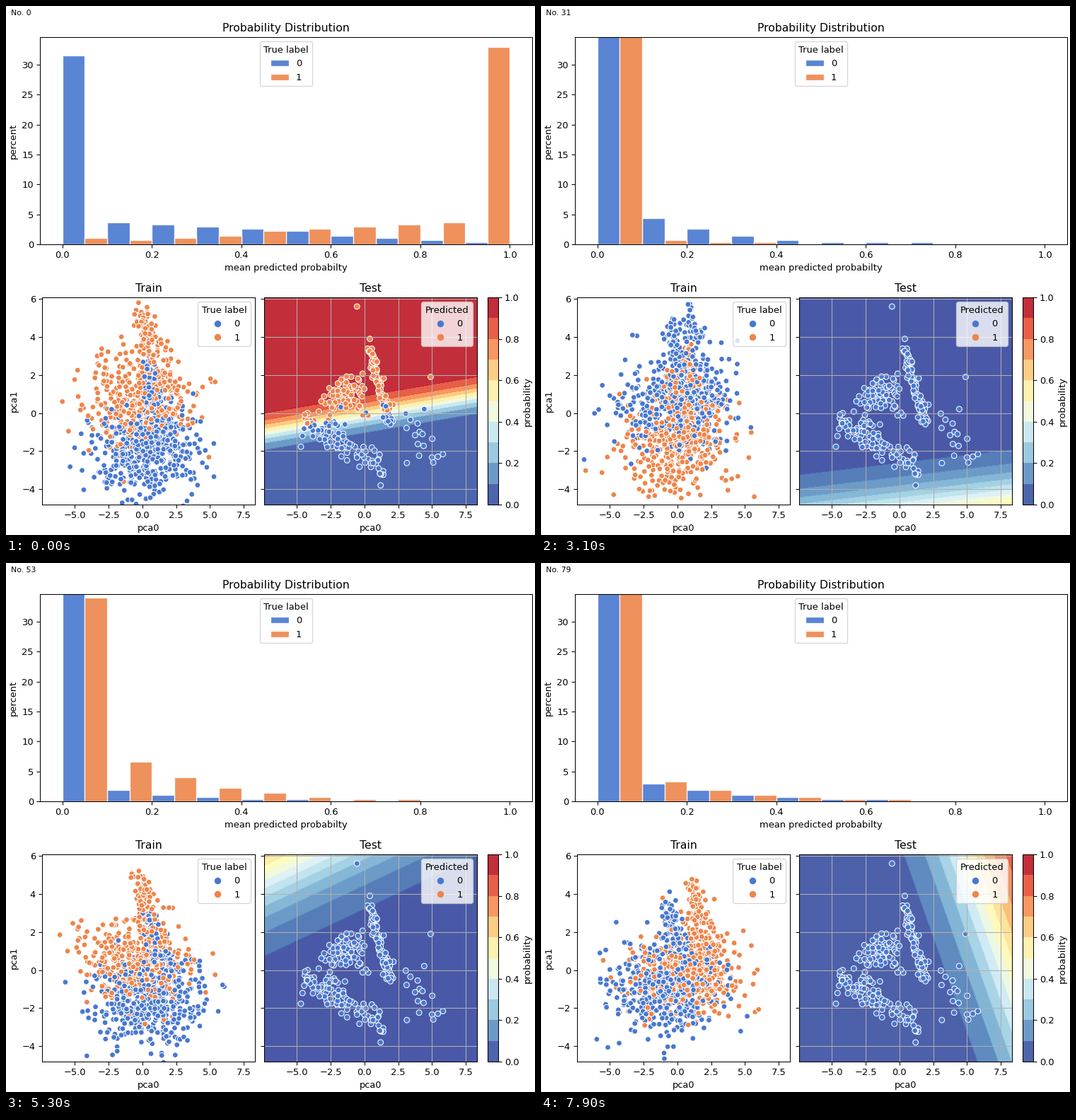
A matplotlib script that plays this animation: 748 by 748 pixels, repeating every 8 s.

```python
import numpy as np
import matplotlib.pyplot as plt
from matplotlib.animation import FuncAnimation
from matplotlib.lines import Line2D
from matplotlib.patches import Patch

SIZE, DPI = 748, 93.5
FRAMES, INTERVAL = 80, 100
COLORS = np.array(["#4878d0", "#ee854a"])
XLIM, YLIM = (-7.42, 8.33), (-4.81, 6.08)
N_TRAIN, N_TEST = 1098, 273
BINS = np.arange(10)

# The model drifts through a few states: the time, the plane a*x + b*y + c
# that is the logit of the probability, and how far the classes stand apart.
TIMES = [0, 10, 22, 39, 53, 61, 79]
FIELDS = np.array([
    (-0.278, 2.28, 0.15),
    (-0.097, 1.91, -6.93),
    (-0.493, -1.42, -5.71),
    (0.604, -0.70, -5.26),
    (-0.204, 0.61, -4.71),
    (0.372, -0.119, -4.29),
    (0.506, 0.253, -4.15),
])
APART = [1.4, 1.9, 1.8, 0.9, 1.1, 0.9, 1.0]

# Samples of each class outside the lowest bin, from the second state on
TAILS = [(0, 35, 28, 12, 16, 20), (18, 8, 4, 44, 14, 22)]

rng = np.random.default_rng(7)


def logit(field, x, y):
    a, b, c = field
    return a * x + b * y + c


def strip(n, start, end, width):
    """Points scattered along a line; width is (at start, at end)."""
    t = rng.random((n, 1))
    start, end = np.array(start), np.array(end)
    spread = width[0] + (width[1] - width[0]) * t
    return start + t * (end - start) + rng.normal(size=(n, 2)) * spread


def cloud(n):
    """A wide body with a spike on top."""
    body = rng.normal((-0.1, -0.6), (2.0, 1.2), (n, 2))
    spike = strip(n, (0.1, 3.9), (1.6, -0.5), (0.25, 0.8))
    return np.where(rng.random((n, 1)) < 0.3, spike, body)


def make_train(labels):
    """Push the classes apart along the slope of each field."""
    side = np.where(labels == 1, 1, -1)[:, None]
    states = []
    for field, apart in zip(FIELDS, APART):
        slope = field[:2] / np.hypot(*field[:2])
        states.append(cloud(N_TRAIN) + side * apart * slope)
    return np.array(states)


def make_test():
    points = np.vstack([
        [(-0.55, 5.6), (0.4, 3.9), (4.9, 1.9), (1.2, -3.8), (-4.7, -1.77)],
        strip(85, (0.4, 3.4), (1.95, -0.6), (0.12, 0.2)),
        strip(45, (-2.9, 0.5), (-0.1, 1.5), (0.4, 0.45)),
        strip(20, (-2.3, 1.4), (0.0, 0.2), (0.4, 0.4)),
        strip(40, (-4.2, -0.6), (-1.9, -1.0), (0.3, 0.45)),
        strip(53, (-2.7, -1.1), (1.4, -2.9), (0.28, 0.3)),
        rng.uniform((-0.6, -2.7), (6.0, 0.4), (25, 2)),
    ])
    return rng.permutation(points)


def make_counts(tails):
    """Bin counts per state: a ramp at first, then a geometric decay."""
    ramp = np.round(11 - 1.1 * BINS)
    decay = 0.4 * 0.6 ** (BINS - 1)
    table = np.array([ramp] + [np.round(tail * decay) for tail in tails])
    table[:, 0] = N_TEST // 2 - table[:, 1:].sum(axis=1)
    return table


train_labels = (rng.random(N_TRAIN) < 0.45).astype(int)
train_states = make_train(train_labels)
train_switch = rng.random((N_TRAIN, 1))
test_points = make_test()
test_noise = rng.normal(0, 0.9, N_TEST)
counts = [make_counts(tails) for tails in TAILS]
counts[1][0] = counts[1][0, ::-1]  # a good model puts class 1 on the right
counts[1][0, -1] += 4
counts[1][0, 0] += 2

fig = plt.figure(figsize=(SIZE / DPI, SIZE / DPI), dpi=DPI)


def add_axes(left, top, right, bottom):
    """Axes whose frame lies on the given pixel columns and rows."""
    return fig.add_axes([left / SIZE, 1 - (bottom + 1) / SIZE,
                         (right - left) / SIZE, (bottom - top) / SIZE])


def add_legend(ax, handles, title, loc):
    ax.legend(handles, ["0", "1"], title=title, loc=loc).set_zorder(6)


def add_scatter(ax, points):
    return ax.scatter(*points.T, s=36, edgecolors="w", linewidths=0.8)


bar_ax = add_axes(48, 43, 744.1, 336)
train_ax = add_axes(51, 411, 352, 704)
test_ax = add_axes(365, 411, 666, 704)
color_ax = add_axes(681, 411, 695.7, 704)
counter = fig.text(0.01, 1 - 13 / SIZE, "", fontsize=8.33)

# Histogram
bar_style = dict(edgecolor="w", linewidth=1, alpha=0.9)
bars = [bar_ax.bar(BINS / 10 + 0.05 * k, 0 * BINS, 0.05, align="edge",
                   color=COLORS[k], **bar_style) for k in (0, 1)]
bar_ax.set(xlim=(-0.05, 1.05), ylim=(0, 34.62), ylabel="percent",
           xlabel="mean predicted probabilty", title="Probability Distribution")
add_legend(bar_ax, [Patch(facecolor=c, **bar_style) for c in COLORS],
           "True label", "upper center")

# Scatter plots
dots = [Line2D([], [], marker="o", ls="", ms=7.3, mfc=c, mew=0)
        for c in COLORS]
for ax, title, legend_title in ((train_ax, "Train", "True label"),
                                (test_ax, "Test", "Predicted")):
    ax.set(xlim=XLIM, ylim=YLIM, title=title, xlabel="pca0",
           xticks=np.arange(-5, 7.6, 2.5), yticks=range(-4, 7, 2))
    add_legend(ax, dots, legend_title, "upper right")
train_ax.set_ylabel("pca1")
test_ax.tick_params(labelleft=False)
test_ax.grid(True)
train_dots = add_scatter(train_ax, train_states[0])
train_dots.set_facecolors(COLORS[train_labels])
test_dots = add_scatter(test_ax, test_points)

# Probability field
grid_x, grid_y = np.meshgrid(np.linspace(*XLIM, 100), np.linspace(*YLIM, 100))


def draw_field(field, levels=10):
    p = 1 / (1 + np.exp(-logit(field, grid_x, grid_y)))
    return test_ax.contourf(grid_x, grid_y, p, levels, cmap="RdYlBu_r",
                            vmin=0, vmax=1, alpha=0.9, zorder=0.5)


contours = [draw_field(FIELDS[0], np.linspace(0, 1, 11))]
fig.colorbar(contours[0], cax=color_ax, ticks=np.arange(0, 1.01, 0.2),
             label="probability")


def update(frame):
    k = min(np.searchsorted(TIMES, frame, side="right") - 1, len(TIMES) - 2)
    mix = (frame - TIMES[k]) / (TIMES[k + 1] - TIMES[k])

    def blend(states):
        return (1 - mix) * states[k] + mix * states[k + 1]

    counter.set_text(f"No. {frame}")
    for group, table in zip(bars, counts):
        for bar, count in zip(group, np.round(blend(table))):
            bar.set_height(100 * count / N_TEST)

    # Train samples are replaced one by one.
    train_dots.set_offsets(np.where(train_switch < mix,
                                    train_states[k + 1], train_states[k]))

    field = blend(FIELDS)
    predicted = logit(field, *test_points.T) + test_noise > 0
    test_dots.set_facecolors(COLORS[predicted.astype(int)])
    contours.pop().remove()
    contours.append(draw_field(field))
    return []


anim = FuncAnimation(fig, update, frames=FRAMES, interval=INTERVAL,
                     init_func=lambda: update(0), repeat=True, repeat_delay=0)
plt.show()
```
